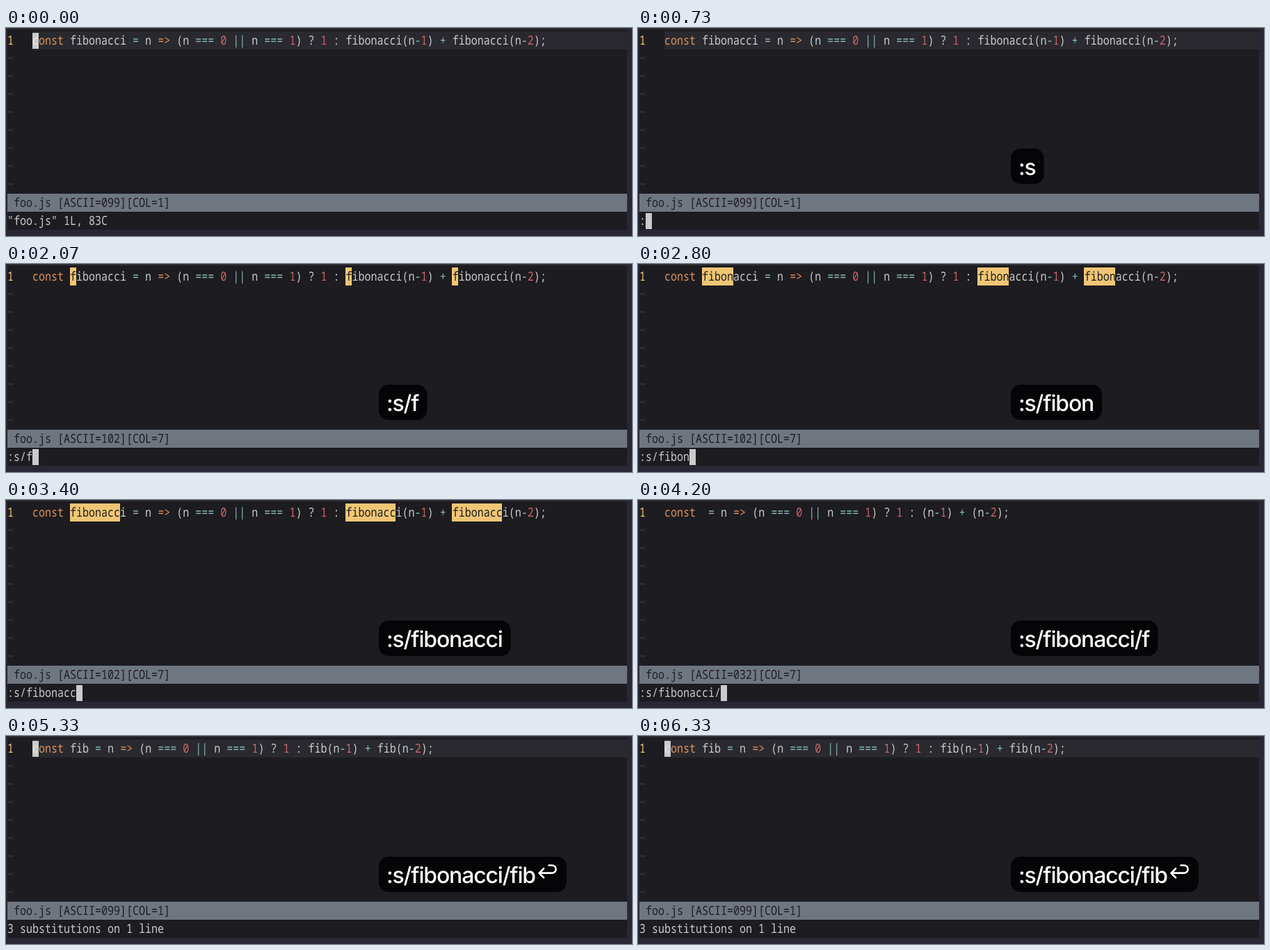
Animation of 900 by 300 pixels, one loop 6.39 s. Source, as an HTML page:

```html
<!DOCTYPE html>
<html lang="en">
<head>
<meta charset="utf-8">
<title>Substitute preview</title>
<style>
  html, body { margin: 0; width: 100%; height: 100%; overflow: hidden; background: #292736; }
  svg { display: block; width: 100%; height: 100%; }
  text { white-space: pre; text-rendering: geometricPrecision; }
  .mono { font: 500 15px "Noto Sans Mono", "DejaVu Sans Mono", monospace; font-variant-ligatures: none; }
  .key { font-family: Inter, "Liberation Sans", sans-serif; font-weight: 500; letter-spacing: -0.035em; fill: #fff; }
</style>
</head>
<body>
<svg id="stage" viewBox="0 0 900 300"></svg>
<script>
const LOOP = 6390;
const CELL = 9, ROW = 26, LEFT = 2, TOP = 5, CODE_COL = 4;
const CURSOR_INSET = 2, CURSOR_HEIGHT = 23;
const ECHO_DELAY = 70;
const COMMAND = ":s/fibonacci/fib";
const WORD = "fibonacci";
// One press per command character, then Return.
const PRESSES = [400, 670, 1000, 1870, 2200, 2330, 2470, 2670,
                 2930, 3070, 3220, 3370, 3800, 4170, 4330, 4530, 5000];
const COLOR = {
  bg: "#1d1c20", line: "#29292f", fg: "#c9ccca", status: "#6f7680",
  number: "#cc6666", keyword: "#de935f", operator: "#8abeb7",
  match: "#f0c674", tilde: "#3d3f47"
};

const stage = document.getElementById("stage");

function add(tag, attrs, parent = stage) {
  const node = document.createElementNS("http://www.w3.org/2000/svg", tag);
  for (const name in attrs) node.setAttribute(name, attrs[name]);
  return parent.appendChild(node);
}

function rect(x, y, width, height, fill) {
  return add("rect", { x, y, width, height, fill });
}

function cursorAt(row, col) {
  return rect(LEFT + col * CELL, TOP + row * ROW + CURSOR_INSET, CELL, CURSOR_HEIGHT, COLOR.fg);
}

function rowText(row, col, fill, content = "") {
  const x = LEFT + col * CELL, y = TOP + row * ROW + 19;
  const node = add("text", { class: "mono", fill, transform: `translate(${x} ${y}) scale(1 1.2)` });
  node.textContent = content;
  return node;
}

function show(node, visible) {
  node.setAttribute("visibility", visible ? "visible" : "hidden");
}

rect(0, 0, 900, 2, "#2e2d36");
rect(LEFT, 2, 891, 289, COLOR.bg);
const cursorLine = rect(38, TOP, 855, ROW, COLOR.line);
const marks = [0, 1, 2].map(() => rect(0, TOP, 0, ROW, COLOR.match));
const codeCursor = cursorAt(0, CODE_COL);
rowText(0, 0, COLOR.match, "1");
const code = rowText(0, CODE_COL, COLOR.fg);
for (let row = 1; row <= 8; row++) rowText(row, 0, COLOR.tilde, "~");
rect(LEFT, TOP + 9 * ROW, 891, ROW, COLOR.status);
const status = rowText(9, 1, COLOR.bg);
const message = rowText(10, 0, COLOR.fg);
const commandCursor = cursorAt(10, 0);

const overlay = add("g", {});
const keyBox = add("rect", { x: 536, y: 174, height: 51, rx: 14, fill: "#050507" }, overlay);
const keyText = add("text", { class: "key", x: 547, y: 212, "font-size": 30 }, overlay);
const returnIcon = add("path", {
  d: "M780.5 186.5H785a5.6 5.6 0 0 1 0 11.2H767M773 191.2L766.5 197.7L773 204.2",
  fill: "none", stroke: "#fff", "stroke-width": 2.7, "stroke-linecap": "round", "stroke-linejoin": "round"
}, overlay);

// Choose the size at which the whole command spans 214 pixels.
keyText.textContent = COMMAND;
keyText.setAttribute("font-size", 30 * 214 / keyText.getComputedTextLength());

function tokenColor(token) {
  if (token === "const" || token === "=>") return COLOR.keyword;
  if (/^\d$/.test(token)) return COLOR.number;
  if (/^(=+|\|\||[+-])$/.test(token)) return COLOR.operator;
  return COLOR.fg;
}

function drawCode(name, matchLength, hasCursor) {
  const source = `const ${name} = n => (n === 0 || n === 1) ? 1 : ${name}(n-1) + ${name}(n-2);`;
  code.textContent = "";
  const span = (content, fill) => { add("tspan", { fill }, code).textContent = content; };
  let found = 0;
  for (const { 0: token, index } of source.matchAll(/\w+|=>|=+|\|\||\s+|./g)) {
    if (matchLength && token === name) {
      const mark = marks[found++];
      mark.setAttribute("x", LEFT + (CODE_COL + index) * CELL);
      mark.setAttribute("width", matchLength * CELL);
      span(token.slice(0, matchLength), COLOR.bg);
      span(token.slice(matchLength), COLOR.fg);
    } else if (hasCursor && index === 0) {
      span(token[0], "#efe6df");
      span(token.slice(1), COLOR.keyword);
    } else {
      span(token, tokenColor(token));
    }
  }
  marks.forEach(mark => show(mark, matchLength > 0));
}

function drawKeys(count) {
  show(overlay, count > 0);
  if (!count) return show(returnIcon, false);
  const entered = count > COMMAND.length;
  keyText.textContent = COMMAND.slice(0, count);
  keyBox.setAttribute("width", keyText.getComputedTextLength() + 23 + (entered ? 33 : 0));
  show(returnIcon, entered);
}

function drawEditor(count) {
  const done = count > COMMAND.length;
  const idle = count === 0 || done;
  const typed = COMMAND.slice(0, count);
  const [, pattern, replacement] = typed.split("/");
  const previewing = pattern !== undefined;
  const replaced = replacement !== undefined;
  const name = replaced ? replacement : WORD;
  // An empty pattern reuses the previous search, "fib".
  const matchLength = previewing && !replaced ? (pattern || "fib").length : 0;

  drawCode(name, matchLength, idle);
  show(cursorLine, idle || !previewing);
  show(codeCursor, idle);
  show(commandCursor, !idle);
  commandCursor.setAttribute("x", LEFT + typed.length * CELL);

  const onWord = !idle && pattern;
  const ascii = !onWord ? "099" : name ? "102" : "032";
  status.textContent = `foo.js [ASCII=${ascii}][COL=${onWord ? 7 : 1}]`;
  message.textContent = done ? "3 substitutions on 1 line" : typed || '"foo.js" 1L, 83C';
}

const pressedBy = time => PRESSES.filter(press => press <= time).length;

function render(time) {
  drawKeys(pressedBy(time));
  drawEditor(pressedBy(time - ECHO_DELAY));
}

const start = performance.now();
function tick() {
  render((performance.now() - start) % LOOP);
  requestAnimationFrame(tick);
}
tick();
</script>
</body>
</html>
```
